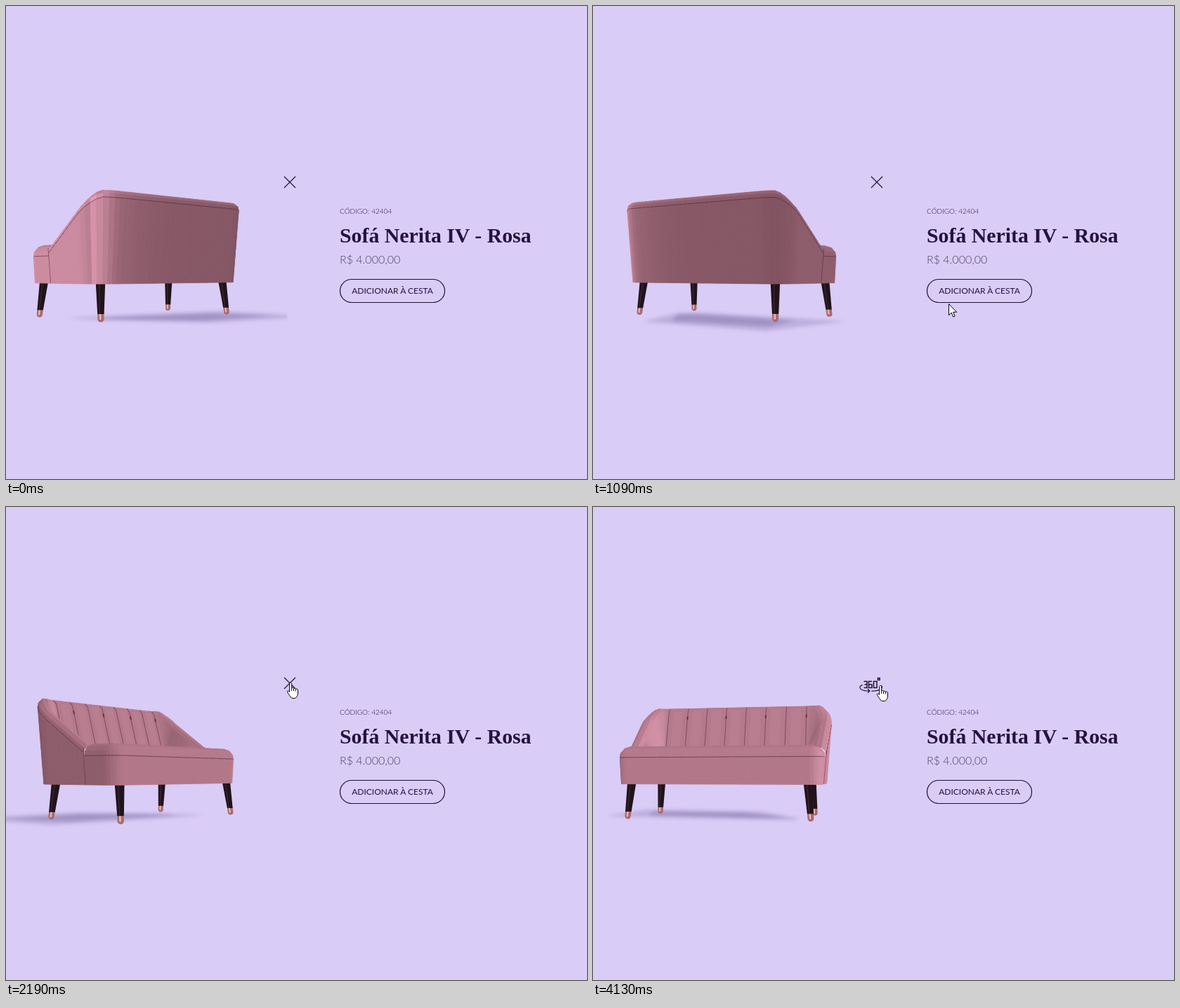
Animation, 827 px wide and 674 px high, one loop 4.2 s. Source, as an HTML page with a canvas:

```html
<!DOCTYPE html>
<html lang="pt-BR">
<head>
<meta charset="utf-8">
<title>Sofá em 360°</title>
<style>
  html, body { margin: 0; width: 100%; height: 100%; overflow: hidden; background: #d9ccf6; }
  canvas, svg { position: absolute; left: 0; top: 0; }
  text { font-family: Lato, sans-serif; fill: #24123f; }
  .line { fill: none; stroke: #1d1133; stroke-width: 1.2; }
  .cursor path { fill: #fff; stroke: #000; stroke-width: 1; stroke-linejoin: round; }
</style>
</head>
<body>
<canvas id="stage" width="827" height="674"></canvas>
<svg width="827" height="674" viewBox="0 0 827 674">
  <text x="475" y="296" font-size="10" font-weight="300">CÓDIGO: 42404</text>
  <text x="475" y="336.5" font-size="29.8" font-weight="700"
    style="font-family:'Liberation Serif',serif">Sofá Nerita IV - Rosa</text>
  <text x="475" y="367" font-size="16" font-weight="300" style="fill:#4f4465">R$ 4.000,00</text>
  <rect class="line" x="475.5" y="389.5" width="149" height="33" rx="16.5"/>
  <text x="550" y="410" font-size="12" text-anchor="middle">ADICIONAR À CESTA</text>
  <path id="close" class="line" d="M396 243l16 16M412 243l-16 16"/>
  <g id="spin" class="line">
    <path stroke-width="1.5" d="M385.5 248.5h4.5v9h-4.5M386.5 253h3.5M397 248.5h-4.5v9h4.5v-4.5h-4.5M399.5 248.5h4.5v9h-4.5zM405.5 243.7h2.6v2.8h-2.6z"/>
    <path d="M384 253.5c-6 2-6 7 4 8.3l5.5.4M391 259.3l3 2.9-3 2.7M396.5 262.3c12 0 17-4 14-8"/>
  </g>
  <g id="cursor" class="cursor">
    <path id="arrow" d="M.5.5v16l3.7-3.5 2.6 6 2.4-1-2.6-5.8h5z"/>
    <g id="hand" transform="translate(-5.5 -1)">
      <path d="M5.6 1.5c1 0 1.6.7 1.6 1.6v5.6c.6-.6 2.7-.5 2.9.9.5-.7 2.6-.5 2.8.9.6-.7 3.1-.4 3.1 1.4v4.1c0 3.2-1.6 6.6-4 7.5H7.4C5.600 22 3 18 1 14.600c-.6-1.200.5-2.100 1.500-1.500L4.100 14.400V3.100c0-.9.6-1.600 1.500-1.600z"/>
      <path style="fill:none" d="M7.200 8.500v4.500M10.100 9.500v3.800M12.900 10.500v3"/>
    </g>
  </g>
</svg>
<script>
const LOOP = 4200, RESET = 2810;
const DIST = 950, EYE = 61, CX = 192, HORIZON = 381;
const ctx = document.getElementById('stage').getContext('2d');
const el = id => document.getElementById(id);

// [ms, degrees]
const TURN = [[0, 222], [690, 190], [1440, 102], [1840, 75], [2190, 50], [2750, 12]];
// [ms, x, y]
const POINTER = [
  [690, 808, 566], [1090, 507, 425], [1440, 450, 334], [1640, 426, 292], [1840, 409, 263],
  [1990, 406, 254], [2190, 405, 250], [2450, 404, 240], [2680, 405, 250], [3000, 405, 250],
  [3400, 516, 285], [3600, 516, 285], [4070, 413, 257], [4130, 409, 254]
];

function sample(table, t) {
  const last = table[table.length - 1];
  if (t <= table[0][0]) return table[0].slice(1);
  const i = table.findIndex(row => row[0] > t);
  if (i < 0) return last.slice(1);
  const a = table[i - 1], b = table[i], k = (t - a[0]) / (b[0] - a[0]);
  return a.slice(1).map((v, j) => v + (b[j + 1] - v) * k);
}

// Plan outlines: points {u, v} with outward normal {nu, nv}
function line(u0, v0, u1, v1, nu, nv, n) {
  return Array.from({ length: n }, (_, i) =>
    ({ u: u0 + (u1 - u0) * i / n, v: v0 + (v1 - v0) * i / n, nu, nv }));
}
function arc(cu, cv, r, from, n) {
  return Array.from({ length: n }, (_, i) => {
    const a = from + Math.PI / 2 * i / n, nu = Math.cos(a), nv = Math.sin(a);
    return { u: cu + r * nu, v: cv + r * nv, nu, nv };
  });
}
const shellPlan = [
  ...line(-146, 25, -146, -40, -1, 0, 8),
  ...arc(-106, -40, 40, Math.PI, 8),
  ...line(-106, -80, 106, -80, 0, -1, 28),
  ...arc(106, -40, 40, Math.PI * 1.5, 8),
  ...line(146, -40, 146, 25, 1, 0, 8),
  { u: 146, v: 25, nu: 1, nv: 0 }
];
const BACK = 16;
const seatPlan = [
  ...line(137, 25, 137, 58, 1, 0, 3),
  ...arc(123, 58, 14, 0, 6),
  ...line(123, 72, -123, 72, 0, 1, 12),
  ...arc(-123, 58, 14, Math.PI / 2, 6),
  ...line(-137, 58, -137, 25, -1, 0, 3),
  { u: -137, v: 25, nu: -1, nv: 0 }
];

// Cross sections as [inset, height], from the outside bottom over the top
function shellRows(p) {
  const h = 163 - 0.68 * Math.max(0, p.v + 72);
  const e = 9 * (172 - h) / 115;
  return [[9, 48], [e, h - 9], [e + 1, h - 4], [e + 6, h], [e + 13, h - 1], [e + 18, h - 6],
    [36, Math.min(97, h - 8)]];
}
const seatRows = () => [[0, 48], [-2, 84], [-1, 90], [4, 96], [13, 99]];

const sweep = (plan, rows) => plan.map(p =>
  rows(p).map(([d, y]) => [p.u - p.nu * d, y, p.v - p.nv * d]));
const shell = sweep(shellPlan, shellRows);
const seat = sweep(seatPlan, seatRows);

const sub = (a, b) => a.map((v, i) => v - b[i]);
const dot = (a, b) => a[0] * b[0] + a[1] * b[1] + a[2] * b[2];
const cross = (a, b) => [a[1] * b[2] - a[2] * b[1], a[2] * b[0] - a[0] * b[2], a[0] * b[1] - a[1] * b[0]];

function makeView(deg) {
  const a = deg * Math.PI / 180, c = Math.cos(a), s = Math.sin(a);
  return {
    eye: [-DIST * s, EYE, DIST * c],
    project([u, y, v]) {
      const z = v * c - u * s, k = DIST / (DIST - z);
      return { x: CX + (u * c + v * s) * k, y: HORIZON - (y - EYE) * k, z, k };
    }
  };
}

function trace(points) {
  ctx.beginPath();
  points.forEach(p => ctx.lineTo(p.x, p.y));
}

function fabric(n, p, inner) {
  let b = 157 + 22 * n[2] + (n[0] > 0 ? 48 : 14) * n[0] + 12 * n[1];
  if (!inner && n[2] < -0.5) b += 22 * Math.exp((p[0] - 110) / 45);
  if (inner && Math.abs(p[0]) < 106) b += 9 * Math.sin(Math.PI * (((p[0] + 106) / 30.29) % 1)) - 4;
  return `rgb(${b | 0},${0.757 * b - 14.5 | 0},${0.857 * b - 14.3 | 0})`;
}

function addSurface(items, grid, view, innerRow, seamRow) {
  for (let i = 0; i < grid.length - 1; i++) {
    for (let j = 0; j < grid[i].length - 1; j++) {
      const q = [grid[i][j], grid[i + 1][j], grid[i + 1][j + 1], grid[i][j + 1]];
      const n = cross(sub(q[3], q[0]), sub(q[1], q[0]));
      if (dot(n, sub(view.eye, q[0])) <= 0) continue;
      const len = Math.hypot(...n) || 1;
      const pts = q.map(view.project);
      const z = pts.reduce((sum, p) => sum + p.z, 0) / 4;
      const mid = q[0].map((v, k) => (v + q[1][k]) / 2);
      items.push({ z, pts, fill: fabric(n.map(v => v / len), mid, j === innerRow) });
      if (j === seamRow) items.push({ z: z + 4, pts: [pts[3], pts[2]], ink: 0.6, w: 1 });
    }
  }
}

function addChannels(items, view) {
  for (let m = 0; m <= 7; m++) {
    const col = shell[BACK + 4 * m];
    const n = cross(sub(col[6], col[5]), [1, 0, 0]);
    if (dot(n, sub(view.eye, col[5])) <= 0) continue;
    const pts = col.slice(4).map(view.project);
    items.push({ z: pts[2].z + 6, pts, ink: 0.45, w: 1.1 });
    if (m % 2) {
      const a = col[5], b = col[6];
      const tuft = [0.12, 0.2].map(k => view.project(a.map((v, x) => v + (b[x] - v) * k)));
      items.push({ z: pts[2].z + 7, pts: tuft, ink: 0.6, w: 2.2 });
    }
  }
}

function addSideSeams(items, view) {
  for (const side of [-1, 1]) {
    if (side * view.eye[0] < 140) continue;
    const pts = [[137, 48], [141, 94]].map(([u, y]) => view.project([side * u, y, 25]));
    items.push({ z: pts[0].z + 8, pts, ink: 0.45, w: 1 });
  }
}

function drawShadow(view) {
  const layers = [
    [[[-180, 10], [-180, -170], [20, -150], [100, 0], [100, 40], [-40, 30]], 0.2],
    [[[-125, -20], [-150, -120], [0, -120], [85, -10], [60, 10]], 0.26]
  ];
  ctx.save();
  ctx.beginPath();
  ctx.rect(0, 400, 400, 70);
  ctx.clip();
  ctx.filter = 'blur(2.5px)';
  for (const [plan, alpha] of layers) {
    trace(plan.map(([u, v]) => view.project([u, 0, v])));
    ctx.fillStyle = `rgba(80,65,125,${alpha})`;
    ctx.fill();
  }
  ctx.restore();
}

function drawLeg({ u, v }, view) {
  const at = k => view.project([u * (1 - 0.035 * k), 52 * k, v - Math.sign(v) * 6 * k]);
  const top = at(1), cuff = at(0.2), foot = at(0.085), k = foot.k;
  const stroke = (a, b, dx, w, color) => {
    ctx.beginPath();
    ctx.moveTo(a.x + dx, a.y);
    ctx.lineTo(b.x + dx, b.y);
    ctx.lineWidth = w;
    ctx.strokeStyle = color;
    ctx.stroke();
  };
  ctx.lineCap = 'round';
  stroke(cuff, foot, 0, 8 * k, '#a9696f');
  stroke(cuff, foot, -0.8, 2.2 * k, '#e6b9b8');
  ctx.lineCap = 'butt';
  const a = 6 * k, b = 4.1 * k;
  trace([{ x: top.x - a, y: top.y }, { x: top.x + a, y: top.y },
    { x: cuff.x + b, y: cuff.y }, { x: cuff.x - b, y: cuff.y }]);
  ctx.fillStyle = '#21131b';
  ctx.fill();
  stroke(top, cuff, -1.5 * k, 1.5, '#3a252d');
}

function drawSofa(deg) {
  const view = makeView(deg);
  ctx.clearRect(0, 0, 827, 674);
  drawShadow(view);
  [[-124, 72], [124, 72], [-119, -58], [119, -58]]
    .map(([u, v]) => ({ u, v, z: view.project([u, 0, v]).z }))
    .sort((a, b) => a.z - b.z)
    .forEach(leg => drawLeg(leg, view));

  const items = [];
  addSurface(items, shell, view, 5, 0);
  addSurface(items, seat, view, -1, 0);
  addChannels(items, view);
  addSideSeams(items, view);
  items.sort((a, b) => a.z - b.z);
  ctx.lineJoin = 'round';
  for (const it of items) {
    trace(it.pts);
    if (it.fill) {
      ctx.closePath();
      ctx.fillStyle = ctx.strokeStyle = it.fill;
      ctx.lineWidth = 0.8;
      ctx.fill();
    } else {
      ctx.strokeStyle = `rgba(70,28,48,${it.ink})`;
      ctx.lineWidth = it.w;
    }
    ctx.stroke();
  }
}

const show = (id, on) => { el(id).style.display = on ? '' : 'none'; };
let shownAngle = null;

function render(t) {
  const step = Math.floor((t + 5) / 68.1) * 68.4;
  const done = t >= RESET;
  const angle = done ? -12 : sample(TURN, Math.min(step, 2750))[0];
  if (angle !== shownAngle) drawSofa(shownAngle = angle);
  show('close', !done);
  show('spin', done);

  const [x, y] = sample(POINTER, t >= 4130 ? 4130 : Math.min(step, 4070));
  const hand = x < 412.5 && y < 262;
  show('cursor', t >= 685);
  show('hand', hand);
  show('arrow', !hand);
  el('cursor').setAttribute('transform', `translate(${Math.round(x)} ${Math.round(y)})`);
}

const start = performance.now();
function tick() {
  render((performance.now() - start) % LOOP);
  requestAnimationFrame(tick);
}
tick();
</script>
</body>
</html>
```
